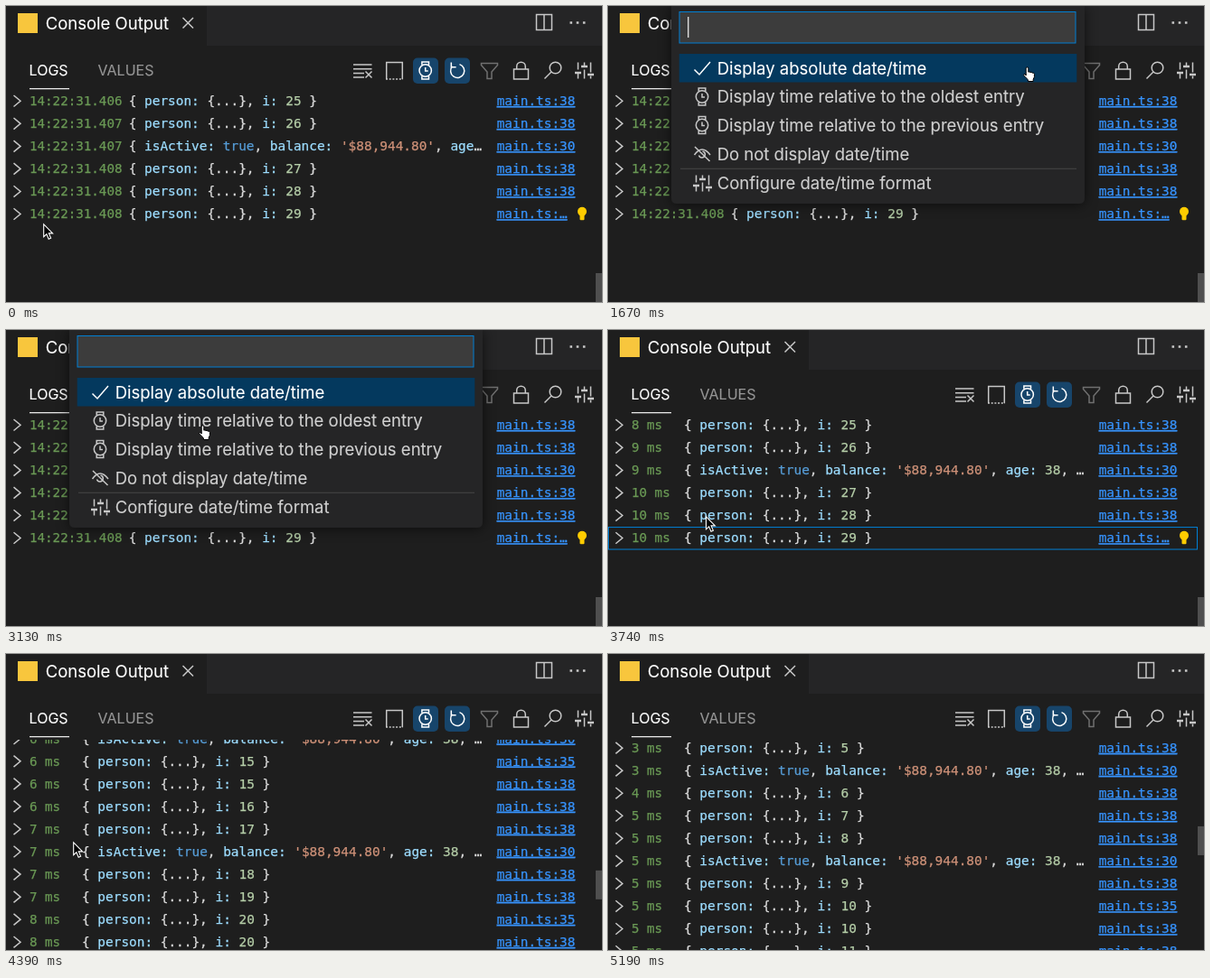
An HTML page for the animation above (6150 ms loop, 659 by 328 pixels).

```html
<!DOCTYPE html>
<html lang="en">
<head>
<meta charset="utf-8">
<title>Console Output</title>
<style>
  html, body { margin: 0; width: 100%; height: 100%; overflow: hidden; background: #1e1e1e; }
  svg { display: block; width: 100vw; height: 100vh; }
  text { white-space: pre; color: #dcdcdc; fill: currentColor; stroke: currentColor; stroke-width: .25; }
  .ui { font-family: Inter, Roboto, sans-serif; font-size: 18.5px; }
  .ui text { color: #d0d0d0; stroke-width: .12; }
  .ui .on { color: #fff; }
  .ui .off { color: #969696; }
  .caps { font-size: 16px; }
  .log { font-family: "DejaVu Sans Mono", monospace; font-size: 14.42px; }
  .line { fill: none; stroke: #c8c8c8; stroke-width: 1.5; }
  .time { color: #6a9955; font-size: 14.2px; }
  .key { color: #9cdcfe; }
  .bool { color: #569cd6; }
  .str { color: #ce9178; }
  .num { color: #b5cea8; }
  .link { color: #3794ff; text-decoration: underline; }
  #menu { filter: drop-shadow(0 1px 7px rgba(0, 0, 0, .6)); }
</style>
</head>
<body>
<svg viewBox="0 0 659 328">
  <defs>
    <clipPath id="list"><rect y="95" width="659" height="233"/></clipPath>
    <g id="watch">
      <circle r="6.7"/>
      <path d="M-3.8-6V-9.5H3.8V-6M-3.8 6V9.5H3.8V6M0-3.5V.5H3"/>
    </g>
    <g id="sliders">
      <path d="M-7-9V-1M-7 3V9M0-9V-5M0-1V9M7-9V2M7 6V9"/>
      <path d="M-10.5 2.5H-3.5M-3.5-4.5H3.5M3.5 4.5H10.5" stroke-width="2.4"/>
    </g>
  </defs>
  <rect width="659" height="328" fill="#1e1e1e"/>

  <g class="log" clip-path="url(#list)"><g id="rows"></g></g>
  <rect id="thumb" x="652" width="7" height="32" fill="#4f4f4f"/>

  <g class="ui">
    <rect x="222" width="437" height="44" fill="#252526"/>
    <rect x="13" y="8" width="22" height="22" fill="#f8c63d"/>
    <text class="on" x="43.7" y="25.7">Console Output</text>
    <text class="caps on" x="25.6" y="76.8">LOGS</text>
    <text class="caps off" x="101.6" y="76.8">VALUES</text>
    <rect x="26" y="91" width="44" height="1.3" fill="#e7e7e7"/>
  </g>

  <g class="line">
    <path d="M195.5 13L207 24.5M207 13L195.5 24.5"/>
    <path d="M586.5 9.5H603.5V26.5H586.5ZM595 9.5V26.5"/>
    <path d="M623.5 18.5h2.6m4.6 0h2.6m4.6 0h2.6" stroke-width="2.4"/>
    <path d="M384 65H404.5M384 69.7H404.5M384 74.4H396M384 79H396M397.5 72.5L404.5 79.5M404.5 72.5L397.5 79.5"/>
    <path d="M420.7 81V62.5H438.3V81"/>
    <path d="M420 81H439" stroke-dasharray="2 1.7"/>
    <g fill="#17456b" stroke="none">
      <rect x="450" y="57.5" width="28" height="28.5" rx="5"/>
      <rect x="485" y="57.5" width="28" height="28.5" rx="5"/>
    </g>
    <use href="#watch" x="463.7" y="71.5" stroke="#fff"/>
    <path d="M493.5 66.8A7.6 7.6 0 1 0 501.5 64.6M492.3 62.5V67.8H497.6" stroke="#fff"/>
    <path d="M525.5 63.5H543.5V65.5L537 73V80.5H532V73L525.5 65.5Z" stroke="#707070"/>
    <path d="M561.5 70H577.5V81H561.5ZM564.7 70V67a4.8 4.8 0 0 1 9.6 0V70"/>
    <circle cx="607.5" cy="68.5" r="6.3"/>
    <path d="M603 73L595.5 80.5"/>
    <use href="#sliders" x="639.5" y="71.5"/>
  </g>

  <g id="menu">
    <path d="M70 0H527V213q0 6-6 6H76q-6 0-6-6Z" fill="#252526"/>
    <rect x="79" y="6.5" width="438" height="34.5" fill="#3c3c3c" stroke="#007fd4"/>
    <rect id="caret" x="88" y="12" width="1.4" height="23" fill="#ddd"/>
    <rect x="78.7" y="53" width="439.6" height="31.5" fill="#04395e"/>
    <path d="M80 180.3H518" stroke="#454545"/>
    <g id="items" class="ui"></g>
    <g class="line">
      <path d="M95.5 70.5L101 76L113 62" stroke="#fff"/>
      <use href="#watch" x="104" y="100.5"/>
      <use href="#watch" x="104" y="132"/>
      <path d="M95.5 165Q104 153 113 165M100.5 165.5a3.5 3.5 0 1 0 4-4.5M96 156L112.5 172"/>
      <use href="#sliders" x="104.5" y="196.5"/>
    </g>
  </g>

  <g id="pointer">
    <path id="arrow" d="M.7.8V14.7L3.9 11.8L6.2 17.2L8.6 16.2L6.3 10.9H10.6Z"
      fill="#000" stroke="#fff" stroke-width="1.1"/>
    <path id="hand" d="M3.2 10V2.2a1.3 1.3 0 0 1 2.6 0V6.2q1.2-.8 2.2.3q1.3-.6 2 .6q1.9-.5 2.4 1.3v3.1q-.5 1.5-1.2 2.6v2.4H5.4v-1.8Q3 12.5 1 10.2q-.8-1.2.2-1.8q1-.2 2 1.6z"
      fill="#fff" stroke="#000"/>
  </g>
</svg>

<script>
const $ = id => document.getElementById(id);
const LOOP = 6150, PITCH = 25.05, TOP = 105;

const menuItems = ['Display absolute date/time', 'Display time relative to the oldest entry',
  'Display time relative to the previous entry', 'Do not display date/time', 'Configure date/time format'];
$('items').innerHTML = menuItems.map((label, k) =>
  `<text x="120.7" y="${75.5 + 31.8 * k}"${k ? '' : ' class="on"'}>${label}</text>`).join('');

// Log entries: a detail line after every third person, an extra line at multiples of five
const entries = [];
for (let i = 4; i < 30; i++) {
  if (i % 5 === 0) entries.push({ i, line: 35 });
  entries.push({ i, line: 38 });
  if (i % 3 === 2 && i < 29) entries.push({ i: i + .5, line: 30 });
}
const firstShown = entries.length - 6;
const elapsed = i => 3 + [5.5, 6, 11, 16, 19, 25, 26.5].filter(v => v < i).length;
const span = (cls, s) => `<tspan class="${cls}">${s}</tspan>`;

function body({ i, line }, relative) {
  if (line !== 30) return `{ ${span('key', 'person:')} {...}, ${span('key', 'i:')} ${span('num', i)} }`;
  const age = relative ? `${span('key', 'age:')} ${span('num', 38)}, …` : span('key', 'age') + '…';
  return `{ ${span('key', 'isActive:')} ${span('bool', 'true')}, ${span('key', 'balance:')} ` +
    `${span('str', "'$88,944.80'")}, ${age}`;
}

function rowMarkup(entry, k, relative) {
  const y = TOP + (k - firstShown) * PITCH, last = k === entries.length - 1;
  const ms = elapsed(entry.i);
  const extras = '<g fill="#fc0"><circle cx="637" cy="-2.5" r="5"/><rect x="634.5" y="1" width="5" height="6" rx="1"/></g>' +
    (relative ? '<rect x=".5" y="-11.7" width="651" height="24.5" fill="none" stroke="#007fd4"/>' : '');
  return `<g transform="translate(0 ${y})">
    <path class="line" d="M8.5-6L16 .3L8.5 6.5"/>
    <text class="time" x="26" y="5">${relative ? ms + ' ms' : '14:22:31.' + (398 + ms)}</text>
    <text x="${relative ? 84 : 135.7}" y="5">${body(entry, relative)}</text>
    <text class="link" x="542.7" y="5">main.ts:${last ? '…' : entry.line}</text>
    ${last ? extras : ''}</g>`;
}

// Monotone cubic through [time, value...] keys, at rest at both ends
function track(keys, t, c = 1) {
  const end = keys.length - 1;
  if (t <= keys[0][0]) return keys[0][c];
  if (t >= keys[end][0]) return keys[end][c];
  const n = keys.findIndex(k => k[0] > t) - 1;
  const slope = j => (keys[j + 1][c] - keys[j][c]) / (keys[j + 1][0] - keys[j][0]);
  const tangent = j => {
    if (j === 0 || j === end) return 0;
    const a = slope(j - 1), b = slope(j);
    return a * b > 0 ? 2 * a * b / (a + b) : 0;
  };
  const a = keys[n], b = keys[n + 1], d = b[0] - a[0], u = (t - a[0]) / d;
  const s = u * u * (3 - 2 * u);
  return a[c] + (b[c] - a[c]) * s +
    d * u * (1 - u) * ((1 - u) * tangent(n) - u * tangent(n + 1));
}

const pointerKeys = [
  [525, 41, 241], [750, 112, 241], [965, 112, 241], [990, 122, 237], [1430, 459, 67],
  [1985, 459, 67], [2230, 318, 83.5], [2600, 213, 105], [3555, 213, 105],
  [3740, 108, 206], [3960, 74, 208], [5125, 74, 208], [5190, 173, 283]];
const scrollKeys = [[4130, 0], [4260, 145.3], [4530, 684.4], [4640, 775.4]];

const show = (id, on) => $(id).style.display = on ? '' : 'none';
let mode;

function draw(t) {
  const relative = t >= 3360, menu = t >= 1580 && t < 3330;
  if (mode !== relative) {
    mode = relative;
    $('rows').innerHTML = entries.map((e, k) => rowMarkup(e, k, relative)).join('');
  }
  const scroll = track(scrollKeys, t);
  $('rows').setAttribute('transform', `translate(0 ${scroll})`);
  $('thumb').setAttribute('y', 296 - .1355 * scroll);

  show('menu', menu);
  show('caret', t >= 1630 && (t - 1630) % 1000 < 500);

  const x = track(pointerKeys, t, 1), y = track(pointerKeys, t, 2);
  const hand = menu || (x > 447 && y < 86);
  $('pointer').setAttribute('transform', `translate(${x} ${y})`);
  show('pointer', t < 5190);
  show('arrow', !hand);
  show('hand', hand);
}

const start = performance.now();
function frame() {
  draw((performance.now() - start) % LOOP);
  requestAnimationFrame(frame);
}
frame();
</script>
</body>
</html>
```
